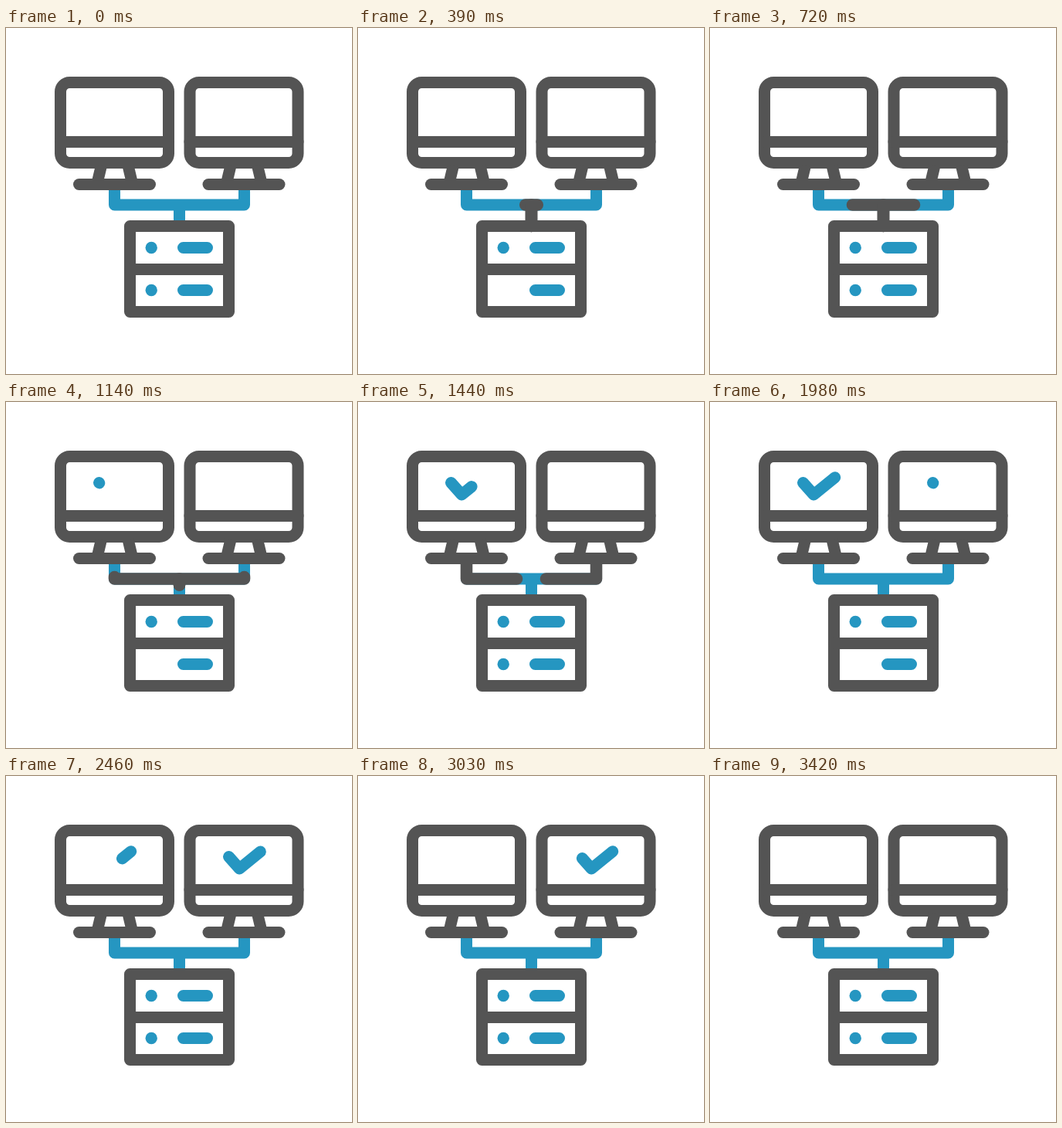
Recreate the animation shown at these times as an HTML page. Size 448 px wide and 448 px high, loop 3.6 s.

```html
<!DOCTYPE html>
<html lang="en">
<head>
<meta charset="utf-8">
<title>Server sync</title>
<style>
  html, body { margin: 0; width: 100%; height: 100%; overflow: hidden; background: #fff; }
  svg { display: block; width: 100vw; height: 100vh; }
  .line { fill: none; stroke-width: 15; stroke-linecap: round; stroke-linejoin: round; }
  .dark { stroke: #545454; }
  .blue { stroke: #2596c1; }
  .butt { stroke-linecap: butt; }
  .flow { stroke-width: 15.6; }
</style>
</head>
<body>
<svg viewBox="0 0 448 448">
  <defs>
    <g id="monitor" class="line dark">
      <rect x="70.5" y="70.5" width="140" height="104" rx="12"/>
      <path d="M70.5 147.5H210.5"/>
      <path class="butt" d="M123.5 178L118.5 199M158 178L163 199"/>
      <path d="M94.5 202.5H186.5"/>
    </g>
  </defs>

  <path class="line blue butt" d="M140.5 204V229H308.5V204M224.5 229V254"/>
  <path class="line dark flow" data-part="flow" d="M224.5 256.5V229H140.5V204"/>
  <path class="line dark flow" data-part="flow" d="M224.5 256.5V229H308.5V204"/>

  <use href="#monitor"/>
  <use href="#monitor" x="167.5"/>

  <g class="line dark">
    <rect x="160.5" y="256.5" width="128" height="111"/>
    <path d="M160.5 312.5H288.5"/>
  </g>
  <path class="line blue" d="M229.5 284.5H260.5M229.5 339.5H260.5"/>
  <circle cx="188.2" cy="284.5" r="7.7" fill="#2596c1"/>
  <circle id="led" cx="188.2" cy="339.5" r="7.7" fill="#2596c1"/>

  <path id="leftCheck" class="line blue" d="M120.5 104.5L134.3 120L161.7 97.7"/>
  <path id="rightCheck" class="line blue" d="M288.5 104.5L302.3 120L329.7 97.7"/>
</svg>
<script>
  const LOOP = 3600, STEP = 30;
  const byId = id => document.getElementById(id);
  const flows = [...document.querySelectorAll('[data-part=flow]')];

  // [time in ms, distance along the cable]
  const headKeys = [[30, 0], [720, 67.5], [1140, 114], [1380, 136.5]];
  const tailKeys = [[900, 0], [1140, 19.5], [1440, 46.5], [1680, 84], [1920, 136.5]];

  const checks = [
    { path: byId('leftCheck'), draw: [1110, 1650], erase: [2160, 2610] },
    { path: byId('rightCheck'), draw: [1950, 2490], erase: [2970, 3420] }
  ];

  // LED goes dark for 360 ms in every 840 ms, then rests lit
  const ledOff = t => t < 3400 && t % 840 >= 120 && t % 840 < 480;

  const clamp = x => Math.min(1, Math.max(0, x));
  const progress = (t, [from, to]) => clamp((t - from) / (to - from));
  const ease = u => u * u * (3 - 2 * u);

  function follow(keys, t) {
    if (t <= keys[0][0]) return keys[0][1];
    for (let i = 1; i < keys.length; i++) {
      const [t0, d0] = keys[i - 1], [t1, d1] = keys[i];
      if (t <= t1) return d0 + (d1 - d0) * (t - t0) / (t1 - t0);
    }
    return keys[keys.length - 1][1];
  }

  function trim(path, from, to, visible) {
    path.style.visibility = visible ? 'visible' : 'hidden';
    const size = Math.max(0.01, to - from);
    path.style.strokeDasharray = `${size} 1000`;
    path.style.strokeDashoffset = -from;
  }

  function render(t) {
    const head = follow(headKeys, t), tail = follow(tailKeys, t);
    for (const flow of flows) trim(flow, tail, head, t >= 30 && t < 1920);

    for (const { path, draw, erase } of checks) {
      const length = path.getTotalLength();
      trim(path, length * ease(progress(t, erase)), length * ease(progress(t, draw)),
        t > draw[0] && t < erase[1]);
    }
    byId('led').style.visibility = ledOff(t) ? 'hidden' : 'visible';
  }

  const start = performance.now();
  function tick() {
    const t = (performance.now() - start) % LOOP;
    render(Math.floor(t / STEP) * STEP);
    requestAnimationFrame(tick);
  }
  tick();
</script>
</body>
</html>
```
